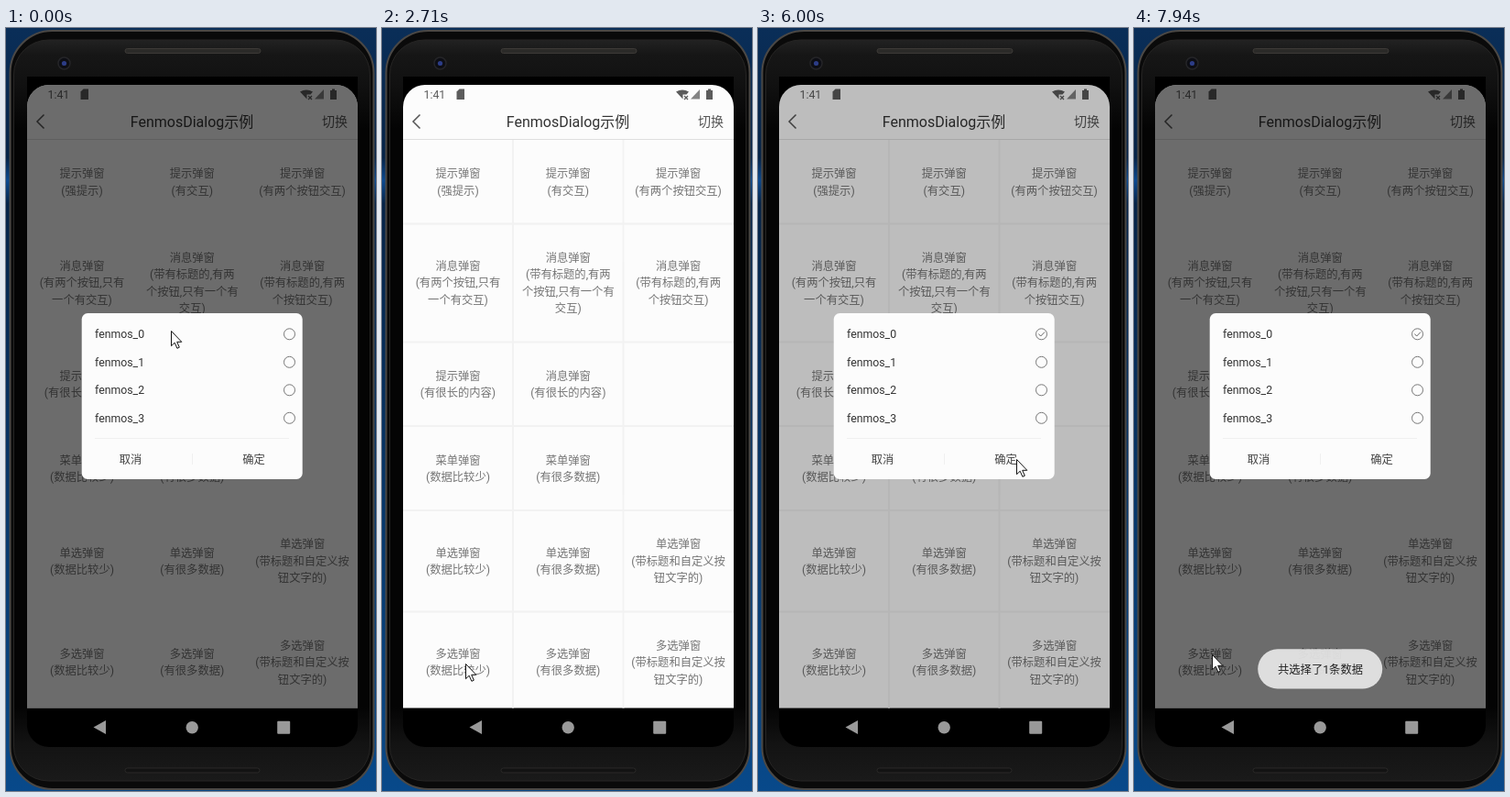
These frames come from a looping animation (404x832 px, 8 s). An HTML page:

```html
<!DOCTYPE html>
<html lang="zh">
<head>
<meta charset="utf-8">
<style>
  html, body { margin: 0; width: 100%; height: 100%; overflow: hidden; background: #04122b; }
  svg { display: block; width: 404px; height: 832px; }
  text { font-family: Roboto, "Noto Sans CJK SC", "Noto Sans CJK", sans-serif; font-size: 12.3px; }
</style>
</head>
<body>
<svg viewBox="0 0 404 832" xmlns="http://www.w3.org/2000/svg">
  <defs>
    <linearGradient id="desk" x2="0" y2="1">
      <stop offset="0" stop-color="#0a2e58"/><stop offset=".17" stop-color="#062448"/>
      <stop offset=".2" stop-color="#0c4a90"/><stop offset=".23" stop-color="#062448"/>
      <stop offset="1" stop-color="#08498a"/>
    </linearGradient>
    <linearGradient id="body" x2="0" y2="1">
      <stop offset="0" stop-color="#222"/><stop offset=".02" stop-color="#161616"/>
      <stop offset=".06" stop-color="#111"/><stop offset=".12" stop-color="#040404"/>
      <stop offset=".9" stop-color="#040404"/><stop offset=".95" stop-color="#131313"/>
      <stop offset="1" stop-color="#1a1a1a"/>
    </linearGradient>
    <clipPath id="screen"><path d="M23 741.5V86a24 24 0 0 1 24-24H360a24 24 0 0 1 24 24V741.5Z"/></clipPath>
  </defs>

  <!-- phone -->
  <rect width="404" height="832" fill="url(#desk)"/>
  <rect x="4.5" y="3" width="397" height="827" rx="46" fill="#0a0a0a" stroke="#4b4845" stroke-width="2"/>
  <rect x="8.5" y="13" width="389" height="808" rx="38" fill="url(#body)" stroke="#262524"/>
  <rect x="23" y="53" width="361" height="731" rx="24"/>
  <rect x="23" y="53" width="361" height="60"/>
  <rect x="130" y="22.5" width="148" height="5" rx="2.5" fill="#2b2a28" stroke="#3d3a37"/>
  <rect x="130" y="807" width="147" height="5" rx="2.5" fill="#131313" stroke="#2a2928"/>
  <circle cx="63.5" cy="38.5" r="6.5" fill="#0d0e14" stroke="#252528" stroke-width="1.5"/>
  <circle cx="63.5" cy="38.5" r="2.6" fill="#2c3c86"/>
  <g fill="#999">
    <path d="M95.5 762.5L109 755V770Z"/>
    <circle cx="203.2" cy="762.7" r="6.7"/>
    <rect x="296.2" y="755.7" width="14" height="14" rx="1"/>
  </g>

  <!-- app -->
  <g clip-path="url(#screen)">
    <rect x="23" y="62" width="361" height="680" fill="#fcfcfc"/>
    <g fill="#5c5c5c">
      <text x="45.5" y="77">1:41</text>
      <path d="M84.5 66.5H90V78H81.5V69.5Z"/>
      <path d="M321 69.5Q328 65.5 335 69.5L332.5 72.5H328.5V77.5Z"/>
      <path d="M330 74l4 4m0-4l-4 4" stroke="#5c5c5c" stroke-width="1.3"/>
      <path d="M347 67V77.5H337Z" opacity=".75"/>
      <path d="M354 68h2v-1.5h3V68h2v10h-7Z"/>
    </g>
    <path d="M41.5 94.5L34 102L41.5 109.5" fill="none" stroke="#555" stroke-width="1.5"/>
    <text x="203" y="108" text-anchor="middle" fill="#333" style="font-size:16px">FenmosDialog示例</text>
    <text x="359" y="107" text-anchor="middle" fill="#555" style="font-size:14px">切换</text>
    <path d="M23 121.5H384" stroke="#dedede"/>
    <path id="lines" d="M143 122V742M263.5 122V742M23 213.5H384M23 342.5H384M23 434H384M23 526H384M23 636.5H384" stroke="#f2f2f2" stroke-width="2"/>
    <g id="cells" fill="#757575" text-anchor="middle"></g>
    <rect id="dim" x="23" y="62" width="361" height="680"/>
  </g>

  <g id="dialog">
    <rect x="82.7" y="311" width="241" height="181" rx="6.5" fill="#fcfcfc"/>
    <path d="M97 447.5H309M203.5 464V476" stroke="#f0f0f0"/>
    <g id="options" fill="#333"></g>
    <path id="tick" d="M306.3 333.5L308.7 336L313 331.5" fill="none" stroke="#666"/>
    <g fill="#444" text-anchor="middle">
      <text x="136" y="474.5">取消</text>
      <text x="270.5" y="474.5">确定</text>
    </g>
  </g>

  <g id="toast">
    <rect x="135.2" y="677.3" width="136" height="43.2" rx="21.6" fill="#eaeaea" fill-opacity=".915"/>
    <text x="203.5" y="704" text-anchor="middle" fill="#222">共选择了1条数据</text>
  </g>

  <path id="cursor" d="M.5 .5V16.7L4.2 13.2L6.9 19.3L9.3 18.2L6.7 12.3H11.8Z" fill="#fff" stroke="#111"/>
</svg>

<script>
const $ = id => document.getElementById(id);
const set = (id, name, value) => $(id).setAttribute(name, value);

// Rows of cells: centre line, then the text of each column.
const rows = [
  [168, '提示弹窗|(强提示)', '提示弹窗|(有交互)', '提示弹窗|(有两个按钮交互)'],
  [278, '消息弹窗|(有两个按钮,只有|一个有交互)', '消息弹窗|(带有标题的,有两|个按钮,只有一个有|交互)', '消息弹窗|(带有标题的,有两|个按钮交互)'],
  [388.5, '提示弹窗|(有很长的内容)', '消息弹窗|(有很长的内容)'],
  [480.3, '菜单弹窗|(数据比较少)', '菜单弹窗|(有很多数据)'],
  [581.3, '单选弹窗|(数据比较少)', '单选弹窗|(有很多数据)', '单选弹窗|(带标题和自定义按|钮文字的)'],
  [691.8, '多选弹窗|(数据比较少)', '多选弹窗|(有很多数据)', '多选弹窗|(带标题和自定义按|钮文字的)']
];
const cell = (text, x, mid) => text.split('|').map((line, i, all) =>
  `<text x="${x}" y="${mid + 4.4 + (i - (all.length - 1) / 2) * 18.4}">${line}</text>`).join('');
$('cells').innerHTML = rows.map(([mid, ...cols]) =>
  cols.map((text, c) => cell(text, 83 + c * 120.3, mid)).join('')).join('');

$('options').innerHTML = [0, 1, 2, 3].map(i => {
  const y = 333.8 + i * 30.5;
  return `<text x="97" y="${y + 4.4}">fenmos_${i}</text>
    <circle cx="309.5" cy="${y}" r="6" fill="none" stroke="#777"/>`;
}).join('');

// Progress from 0 to 1 in n equal jumps, as the screen recorder caught it.
const steps = (t, start, length, n) =>
  Math.max(0, Math.min(1, Math.floor((t - start) / length * n) / n));

const openings = [-1000, 3330, 7640], closings = [1470, 6000];
const fullDim = .57;

function dialogPose(t) {
  const opened = openings.findLast(s => s <= t);
  const closed = closings.findLast(s => s <= t) ?? -Infinity;
  if (closed > opened) {
    const p = steps(t, closed, 570, 4);
    return [1 - p ** 1.85, .25 * (1 - p ** 3)];
  }
  const left = 1 - steps(t, opened, 290, 2);
  return [1 - .2 * left ** 2.7, fullDim - .25 * left ** 3];
}

// Mouse moves: start, length, jumps, end point.
const moves = [
  [680, 390, 4, 150, 475],
  [2440, 270, 3, 91, 693],
  [3870, 630, 6, 252, 336],
  [5250, 450, 4, 282, 470],
  [6570, 360, 4, 85, 683]
];

function cursorAt(t) {
  let x = 180, y = 330;
  for (const [start, length, n, toX, toY] of moves) {
    if (t < start) break;
    const gap = length / (n - 1);
    const p = steps(t, start - gap, length + gap, n);
    const ease = (1 - Math.cos(Math.PI * p)) / 2;
    x += (toX - x) * ease;
    y += (toY - y) * ease;
  }
  return [x, y];
}

function draw(now) {
  const t = now % 8000;
  const [scale, dim] = dialogPose(t);
  const checked = t >= 280 && t < closings[0] + 570 || t >= 4810;
  set('dialog', 'transform', `translate(203.2 401.5) scale(${scale}) translate(-203.2 -401.5)`);
  set('dialog', 'visibility', scale ? 'visible' : 'hidden');
  set('dim', 'opacity', dim);
  set('lines', 'opacity', dim < fullDim ? 1 : 0);
  set('tick', 'opacity', checked ? 1 : 0);
  set('toast', 'opacity', steps(t, 6450, 360, 3));
  set('cursor', 'transform', `translate(${cursorAt(t)})`);
  requestAnimationFrame(draw);
}
draw(performance.now());
</script>
</body>
</html>
```
